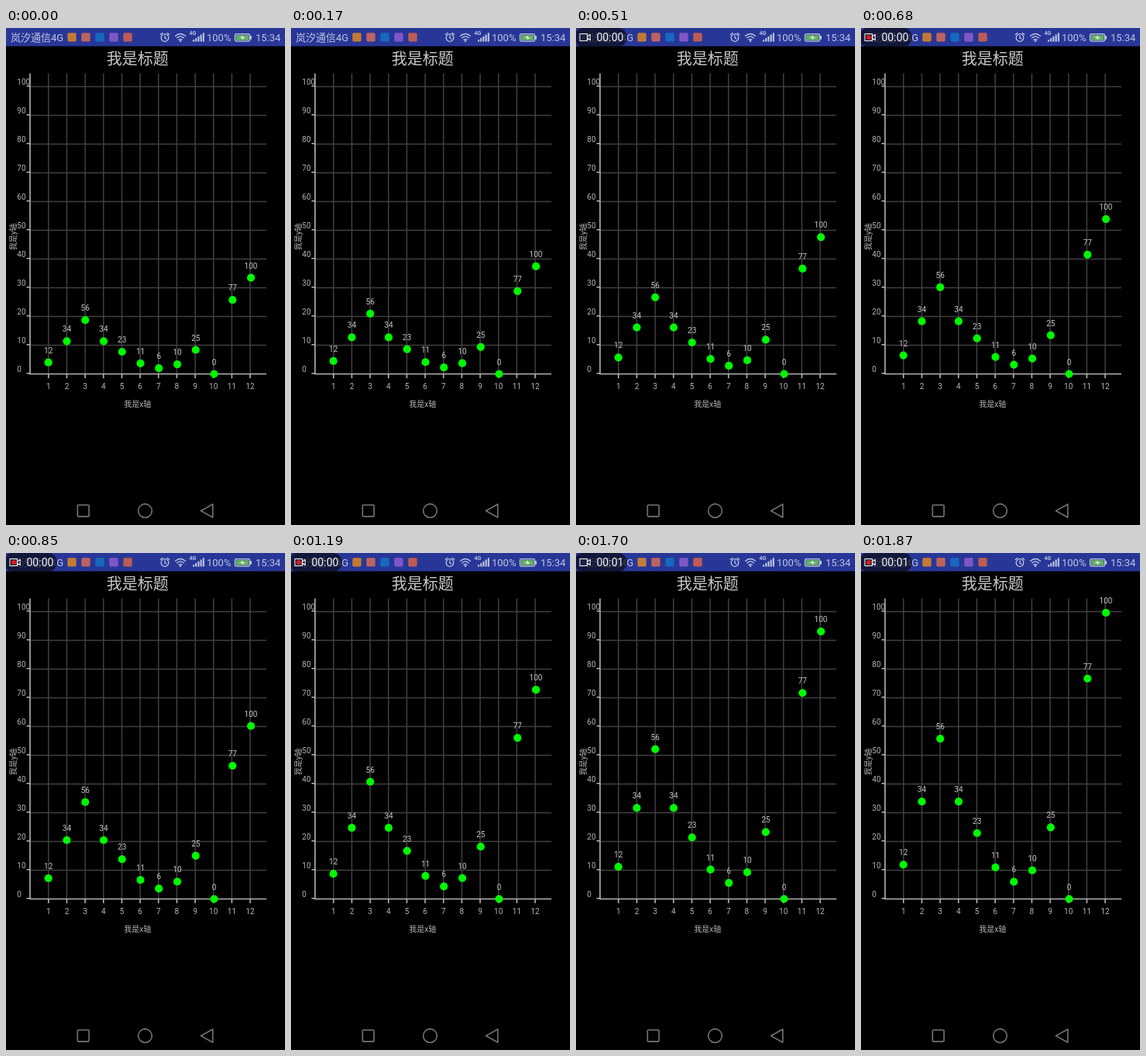
Write an HTML page that moves like this. It is 360 px wide and 640 px high and loops after 2.04 s.

```html
<!DOCTYPE html>
<html lang="zh-CN">
<head>
<meta charset="utf-8">
<style>
  html, body { margin: 0; width: 100%; height: 100%; overflow: hidden; background: #000; }
  svg { display: block; width: 360px; height: 640px; }
  text { font-family: Roboto, "Noto Sans CJK SC", "Noto Sans CJK", sans-serif; }
  .mid { text-anchor: middle; }
</style>
</head>
<body>
<svg viewBox="0 0 360 640">
  <rect width="360" height="640"/>
  <g id="status">
    <rect width="360" height="23.5" fill="#283797"/>
    <g fill="#bfc4e2" font-size="13">
      <text x="6" y="17">岚汐通信4G</text>
      <text x="259" y="17">100%</text>
      <text x="322" y="17">15:34</text>
      <text x="236.5" y="9" font-size="7" font-weight="700">4G</text>
    </g>
    <g id="apps"></g>
    <g fill="none" stroke="#bfc4e2" stroke-width="1.3" stroke-linecap="round">
      <circle cx="205" cy="12.5" r="4.8"/>
      <path d="M205 9.8V12.8L207 14M199.3 8.6L201.8 6.5M208.2 6.5L210.7 8.6"/>
      <path d="M218.5 10.3Q225 4.6 231.5 10.3M220.7 12.8Q225 9 229.3 12.8M222.9 15.2Q225 13.4 227.1 15.2"/>
      <rect x="295.5" y="7.7" width="19" height="9.4" rx="1.5"/>
    </g>
    <circle cx="225" cy="16.8" r="1.2" fill="#bfc4e2"/>
    <g id="bars" fill="#bfc4e2"></g>
    <rect x="315" y="10.2" width="2" height="4.4" fill="#bfc4e2"/>
    <rect x="296.6" y="8.8" width="16.8" height="7.2" fill="#62ab68"/>
    <path d="M301 12.8L306 9.8V12H309.5L304.5 15V12.8Z" fill="#dfe8df"/>
  </g>
  <g id="recorder">
    <rect x="-2" y="0" width="67.5" height="24" rx="11" fill="#0b0d1c" fill-opacity=".74"/>
    <circle id="lamp" cx="10" cy="12" r="3.1" fill="#e01818"/>
    <path d="M5 7.5H14.5V16.5H5ZM14.5 11L18.3 8.6V15.4L14.5 13" fill="none" stroke="#eee" stroke-width="1.1"/>
    <text id="clock" x="26.5" y="17" font-size="14" fill="#f2f2f2"></text>
  </g>

  <text class="mid" x="169.7" y="46.5" font-size="20" fill="#c9c9c9">我是标题</text>
  <path id="grid" fill="none" stroke="#404040" stroke-width="1.5"/>
  <path id="axes" fill="none" stroke="#b4b4b4" stroke-width="1.6"/>
  <g id="labels" font-size="10" fill="#b4b4b4">
    <text class="mid" x="169.7" y="488">我是x轴</text>
    <text class="mid" transform="translate(12.8 269) rotate(-90)">我是y轴</text>
  </g>
  <g id="points" font-size="10" fill="#c4c4c4"></g>

  <g fill="none" stroke="#747474" stroke-width="1.6" stroke-linejoin="round">
    <rect x="92.3" y="614.3" width="14.8" height="14.8" rx="1"/>
    <circle cx="179.5" cy="621.7" r="8.8"/>
    <path d="M251.5 621.7L266.8 613.2V630.2Z"/>
  </g>
</svg>
<script>
const LOOP = 2040, STEP = 170;
const BASE = 445.5, UNIT = 3.7;
const values = [12, 34, 56, 34, 23, 11, 6, 10, 25, 0, 77, 100];
// [time, share of full height]
const growth = [[0, .335], [340, .414], [510, .476], [1190, .728], [1360, .801], [1870, .996]];

const $ = id => document.getElementById(id);
const lineX = i => 54.8 + 23.66 * i;
const pointX = i => 54.7 + 23.76 * i;
const yAt = v => BASE - UNIT * v;

function add(parent, tag, attrs, text = "") {
  const el = document.createElementNS("http://www.w3.org/2000/svg", tag);
  for (const key in attrs) el.setAttribute(key, attrs[key]);
  el.textContent = text;
  return parent.appendChild(el);
}

["#c47a36", "#bd635f", "#1768c0", "#7f57c4", "#bd5b55"].forEach((fill, i) =>
  add($("apps"), "rect", { x: 79.3 + 18 * i, y: 6.2, width: 11.4, height: 11.4, rx: 1.8, fill }));

for (let i = 0; i < 5; i++) {
  const height = 2.4 + 2.2 * i;
  add($("bars"), "rect", { x: 241 + 3.2 * i, y: 17.5 - height, width: 2.1, height });
}

let grid = "", axes = `M31 58.5V446.2M30.2 ${BASE}H336`;
for (let v = 0; v <= 100; v += 10) {
  const y = yAt(v);
  if (v) grid += `M31 ${y}H336`;
  axes += `M26.5 ${y - .7}H31`;
  add($("labels"), "text", { x: 14.3, y: y - 3 }, v);
}
values.forEach((_, i) => {
  const x = lineX(i);
  grid += `M${x} 58.5V${BASE}`;
  axes += `M${x} ${BASE}V451`;
  add($("labels"), "text", { x, y: 465, class: "mid" }, i + 1);
});
$("grid").setAttribute("d", grid);
$("axes").setAttribute("d", axes);

const points = values.map(v => {
  const g = add($("points"), "g", {});
  add(g, "circle", { r: 5.1, fill: "#00f800" });
  add(g, "text", { y: -12, class: "mid" }, v);
  return g;
});

function share(t) {
  const k = growth.findIndex(p => p[0] > t);
  if (k < 0) return growth[growth.length - 1][1];
  const [t0, a] = growth[k - 1], [t1, b] = growth[k];
  return a + (b - a) * (t - t0) / (t1 - t0);
}

function draw(time) {
  const t = Math.floor((time % LOOP) / STEP) * STEP;
  const s = share(t);
  points.forEach((g, i) =>
    g.setAttribute("transform", `translate(${pointX(i)} ${yAt(values[i] * s)})`));
  $("recorder").style.display = t < 340 ? "none" : "";
  $("lamp").style.display = (t >= 680 && t < 1360) || t >= 1870 ? "" : "none";
  $("clock").textContent = t < 1360 ? "00:00" : "00:01";
}

const start = performance.now();
function tick() {
  draw(performance.now() - start);
  requestAnimationFrame(tick);
}
tick();
</script>
</body>
</html>
```
